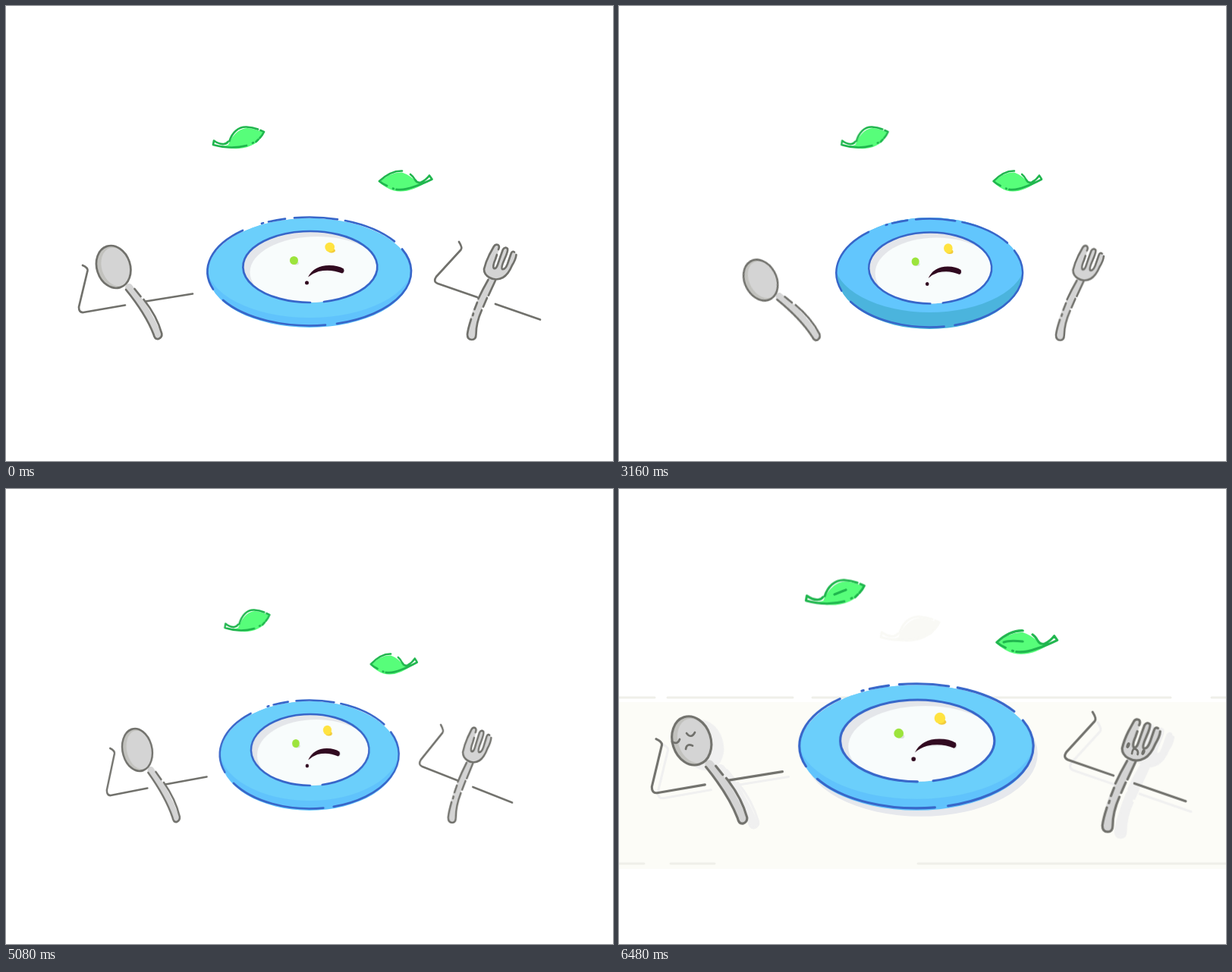
Recreate the animation shown at these times as an HTML page without scripts. Size 800 px wide and 600 px high, loop 6580 ms.

```html
<!DOCTYPE html>
<html lang="en">
<head>
<meta charset="utf-8">
<title>Sad plate</title>
<style>
html, body { margin: 0; width: 100%; height: 100%; overflow: hidden; background: #fff; }
svg { display: block; width: 100vw; height: 100vh; }
path, ellipse, circle { stroke-linecap: round; stroke-linejoin: round; }

.line { fill: none; stroke: var(--s, #71716c); stroke-width: 2.7; }
.body { fill: var(--f, #d4d4d4); }
.dark { fill: var(--f, #c2c2be); }
.grip { fill: none; stroke: var(--f, #d4d4d4); stroke-width: 10; }
.leaf { fill: var(--f, #57fe7a); }
.vein { fill: none; stroke: var(--s, #20b64e); stroke-width: 2.7; }
.rim { fill: none; stroke: #3766c9; stroke-width: 2.7; }
.ink { fill: #310a20; }
.gray { fill: none; stroke: #d8d8d8; stroke-width: 11; }
.flat { fill: #d8d8d8; }
.edge { fill: none; stroke: #efefe9; stroke-width: 3; }
.cast { --s: #f0f0f0; --f: #f0f0f0; }
.faint { --s: #f9f9f5; --f: #f9f9f5; }

/* each stage is cut in and then eases to its full size */
.stage { visibility: hidden; animation: 6580ms step-end infinite; }
.grow { transform-origin: 400px 300px; animation: 6580ms linear infinite; }
.s1 { animation-name: show1; }
.s2 { animation-name: show2; }
.s3 { animation-name: show3; }
.s4 { animation-name: show4; }
.s5 { animation-name: show5; }
.g2 { animation-name: grow2; }
.g3 { animation-name: grow3; }
.g4 { animation-name: grow4; }
.g5 { animation-name: grow5; transform-origin: 0 0; }

@keyframes show1 { 0% { visibility: hidden } 16.41% { visibility: visible } 48.02%, 100% { visibility: hidden } }
@keyframes show2 { 0% { visibility: hidden } 48.02% { visibility: visible } 61.39%, 100% { visibility: hidden } }
@keyframes show3 { 0% { visibility: hidden } 61.39% { visibility: visible } 77.2%, 100% { visibility: hidden } }
@keyframes show4 {
  0% { visibility: visible } 16.41% { visibility: hidden }
  77.2% { visibility: visible } 89.66%, 100% { visibility: hidden }
}
@keyframes show5 { 0% { visibility: hidden } 89.66%, 100% { visibility: visible } }

@keyframes grow2 {
  0%, 48.02% { transform: scaleX(1); animation-timing-function: cubic-bezier(.215, .61, .355, 1) }
  54.1%, 100% { transform: scaleX(1.095) }
}
@keyframes grow3 {
  0%, 61.39% { transform: scaleX(1); animation-timing-function: cubic-bezier(.215, .61, .355, 1) }
  70.2%, 100% { transform: scaleX(1.03) }
}
@keyframes grow4 {
  0%, 30% { transform: scaleX(1) }
  30.01%, 77.2% { transform: scaleX(.878); animation-timing-function: cubic-bezier(.215, .61, .355, 1) }
  86%, 100% { transform: scaleX(1) }
}
@keyframes grow5 {
  0%, 89.66% { transform: translate(12.2px, -2.4px) scale(.97, .987); animation-timing-function: cubic-bezier(.215, .61, .355, 1) }
  98.47%, 100% { transform: translate(0, 0) scale(1, 1) }
}
</style>
</head>
<body>
<svg viewBox="0 0 800 600">
<defs>
  <clipPath id="plateClip"><ellipse cx="400" cy="352" rx="134" ry="72"/></clipPath>
  <clipPath id="deepClip"><ellipse cx="400" cy="352.5" rx="134" ry="73.5"/></clipPath>
  <clipPath id="wellClip"><ellipse cx="400" cy="344" rx="88.5" ry="47"/></clipPath>

  <g id="leafL">
    <path class="leaf" transform="translate(1 2)" d="M274 181Q285 184 292 181C296 172 303 160 317 159Q328 160 339 165C334 177 322 185 306 186Q292 187 274 181Z"/>
    <path class="vein" d="M294.500 178C298 167 306 159 317 159.500Q325 160 332 162.500M335.500 164L340 166Q338 170.500 334.500 174M332.500 176L329.500 179M325 180.600l.8-.4M317 184Q296 189.500 273 183L274 177.500Q281 182.500 287 182Q291 181.500 292.500 179"/>
  </g>
  <g id="leafR">
    <path class="leaf" transform="translate(1 1.500)" d="M491 231Q506 217 521 218Q533 222 541 232Q548 233 556 229Q530 247 510 242Q500 239 491 231Z"/>
    <path class="vein" d="M492 231Q507 217 522 217.500M533 222Q537 225 539 229Q542 234 547 232.500Q554 229 558 223.500L561.500 228.500Q548 235 537 238.500Q525 243 514.500 241.800M510 240.600l.8.2M502 237Q496 234.500 492 231"/>
  </g>
  <g id="leaves"><use href="#leafL"/><use href="#leafR"/></g>

  <g id="face">
    <ellipse cx="400" cy="344" rx="88.5" ry="47" fill="#e4e6ea"/>
    <ellipse cx="410" cy="351" rx="88.5" ry="47" fill="#f8fcfc" clip-path="url(#wellClip)"/>
    <path class="rim" d="M401 391A88.500 47 0 1 1 419 390"/>
    <ellipse cx="382" cy="339" rx="4" ry="2.500" fill="#dde2e0"/>
    <circle cx="379.500" cy="335.500" r="5.500" fill="#9ce43c"/>
    <ellipse cx="429" cy="322.500" rx="5" ry="3" fill="#f2cb3a"/>
    <circle cx="426.700" cy="318" r="6.300" fill="#ffe340"/>
    <path d="M412 351Q428 347 445 353Q447 350 446 348Z" fill="#e1e4e6"/>
    <path class="ink" d="M398 357.500Q406 342 426 342Q438 342 445 346.500Q446.500 351 443 352.500Q428 346.500 412 350Q404 352.500 398 357.500Z"/>
    <circle class="ink" cx="396.500" cy="365" r="2.500"/>
  </g>
  <path id="rim" class="rim" d="M273 373.500A134.500 71.500 0 0 1 312 295.900M337 286.800l2-.6M346 284.500A134.500 71.500 0 0 1 368 280.600M380 279.300A134.500 71.500 0 0 1 437 281.300M447 283A134.500 71.500 0 0 1 512 310.400M522 320.500A134.500 71.500 0 0 1 436 418.900M421 420.600A134.500 71.500 0 0 1 286 387.900"/>
  <g id="plate">
    <ellipse cx="400" cy="352" rx="134" ry="72" fill="#60c3fc"/>
    <ellipse cx="400" cy="341" rx="136" ry="70" fill="#6bcffb" clip-path="url(#plateClip)"/>
    <use href="#rim"/><use href="#face"/>
  </g>
  <g id="deepPlate">
    <ellipse cx="400" cy="352.500" rx="134" ry="73.500" fill="#4bb4dd"/>
    <ellipse cx="400" cy="336" rx="138" ry="68" fill="#62c6fd" clip-path="url(#deepClip)"/>
    <use href="#rim" transform="translate(0 2)"/><use href="#face" transform="translate(0 1.500)"/>
  </g>

  <g id="spoon">
    <path class="grip" d="M162 371Q186 400 200 434"/>
    <path class="line" d="M158 374Q184 406 194.500 433Q196 440 201 439Q206 437 205.300 432Q199 409 181.500 387M177.500 383L169.500 373"/>
    <g transform="rotate(-18 141.700 344)">
      <ellipse class="dark" cx="141.700" cy="344" rx="22" ry="28.500"/>
      <ellipse class="body" cx="144.500" cy="345" rx="18.500" ry="26"/>
      <ellipse class="line" cx="141.700" cy="344" rx="22" ry="28.500"/>
    </g>
  </g>
  <g id="fork">
    <path class="grip" d="M640 361Q632 376 625 392Q614 414 613.500 434"/>
    <path class="line" d="M635.500 361Q628 374 622.500 386M621 391L617.500 400M616 405.500l-.8 2.500M613 413Q609 425 608 433Q608 440 614 440Q619.500 440 619.500 433Q619.500 418 627 401M629 396.500L634 385M636 381.500L645 362"/>
    <path class="body" d="M643 316Q648 312 651 317Q650 322 645 334Q641 343 643 346Q646 347 648 341Q652 329 655 321Q658 317 661 320Q662 323 657 334Q652 345 654 347Q658 348 661 340L666 326Q669 322 673 327Q672 334 667 342Q662 354 655 358Q646 363 637 358Q630 354 630 347Q632 338 637 328Z"/>
    <path class="line" d="M649 321Q651 317 648.500 315Q645 313.500 643 317L637 328Q632 338 630 347Q630 354 637 358Q646 363 655 358Q662 354 667 342Q672 334 672.500 328M670 324.500Q667 322.500 665.500 327L661 340Q658 348 654 347Q652 345 657 334Q662 323 661 320Q658 317 655 321Q652 329 648 341Q646 347 643 346Q641 343 645 334L647 328"/>
  </g>
  <path id="armL" class="line" d="M101 342Q108 345 107.500 349L96 397Q96 404.500 102 404L157 394.500M184 389.500L246 379.500"/>
  <path id="armR" class="line" d="M597 311Q602 319 599.500 321.500L567 357Q562.500 363.500 569 366L621 384M645 393L704 413.500"/>

  <g id="cutlery">
    <use href="#spoon" transform="translate(181 360) rotate(-13.300) translate(-141.700 -344)"/>
    <use href="#fork" transform="translate(-13 0) rotate(1.200 650 335)"/>
  </g>
</defs>

<rect width="800" height="600" fill="#fff"/>

<g class="stage s1">
  <path class="flat" d="M277 173Q287 179 294 177C298 168 306 155 318 155C328 155 334 160 342 161C336 173 324 182 306 182C296 182 286 179 275 179Z"/>
  <path class="flat" d="M495 226Q508 212 522 213Q533 214 540 225Q543 230 548 226Q555 224 561 219L564 224Q556 228 544 231Q526 242 509 235Q501 231 495 226Z"/>
  <ellipse class="gray" cx="402.500" cy="342" rx="134" ry="71.500"/>
  <ellipse class="gray" cx="402.500" cy="337" rx="88" ry="47.500"/>
  <circle class="flat" cx="373.300" cy="326" r="5.600"/>
  <circle class="flat" cx="430.300" cy="312" r="5.600"/>
  <circle class="flat" cx="384.700" cy="368" r="4.300"/>
  <path class="gray" style="stroke-width:8" d="M388 358Q396 339.500 414 339.500Q431 340 441 352"/>
  <path class="gray" style="stroke-width:10" d="M180 355C172 354 169 360 174 369C179 382 187 392 195 392C202 391 208 386 208 379C207 369 193 357 180 355ZM209 388L265 440"/>
  <path class="gray" d="M607 345L572 420M603 309L596.500 328Q595 338 605 342Q616 345 620 337L629 320M616 312L607 338"/>
</g>

<g class="stage s2"><g class="grow g2">
  <g transform="matrix(.914 0 0 1 43.800 0)"><use href="#leaves"/><use href="#deepPlate"/></g>
  <use href="#cutlery" transform="matrix(.944 0 0 1 16 1.500)"/>
</g></g>

<g class="stage s3"><g class="grow g3">
  <g transform="matrix(.97 0 0 1 29 .5)"><use href="#leaves"/><use href="#plate"/></g>
  <path class="line" d="M142 366.500L150.500 369.500V430.500L207 405.500"/>
  <use href="#cutlery"/>
</g></g>

<g class="stage s4"><g class="grow g4">
  <use href="#leaves"/><use href="#plate"/>
  <use href="#armL"/><use href="#spoon"/>
  <use href="#armR"/><use href="#fork"/>
</g></g>

<g class="stage s5"><g class="grow g5">
  <rect x="-40" y="281" width="900" height="220" fill="#fcfcf7"/>
  <path class="edge" d="M-40 275H47M64 275H229M255 275H727M781 275H860M-40 494H33M68 494H126M394 494H860"/>
  <g transform="matrix(1.148 0 0 1.148 -67 -63)">
    <use class="faint" href="#leafL" transform="translate(86 42)"/>
    <ellipse cx="405" cy="359" rx="134" ry="72" fill="#e6e8ed"/>
    <g class="cast">
      <use href="#armL" transform="translate(7 6)"/>
      <use href="#spoon" transform="translate(13 5)"/>
      <use href="#armR" transform="translate(11 12)"/>
      <use href="#fork" transform="matrix(1.030 0 0 1.030 2 2)"/>
    </g>
    <use href="#leaves"/>
    <path class="vein" d="M305.700 176L318.800 170.700M500 230.800Q507 228.200 521.800 230"/>
    <use href="#plate"/>
    <use href="#armL"/><use href="#spoon"/>
    <use href="#armR" transform="translate(5 0)"/>
    <use href="#fork" transform="matrix(1.030 0 0 1.030 -13 -4.600)"/>
  </g>
  <path class="line" d="M70 333Q77 338 80 330M89 322Q95 330 100 321M88 343Q89 335 97 338.500"/>
  <path class="line" d="M676 349Q677 341 681 343Q685 345 683.500 350"/>
  <ellipse cx="671" cy="338" rx="2.300" ry="4" transform="rotate(20 671 338)" fill="#71716c"/>
  <ellipse cx="691" cy="347" rx="2.300" ry="4" transform="rotate(20 691 347)" fill="#71716c"/>
</g></g>
</svg>
</body>
</html>
```
